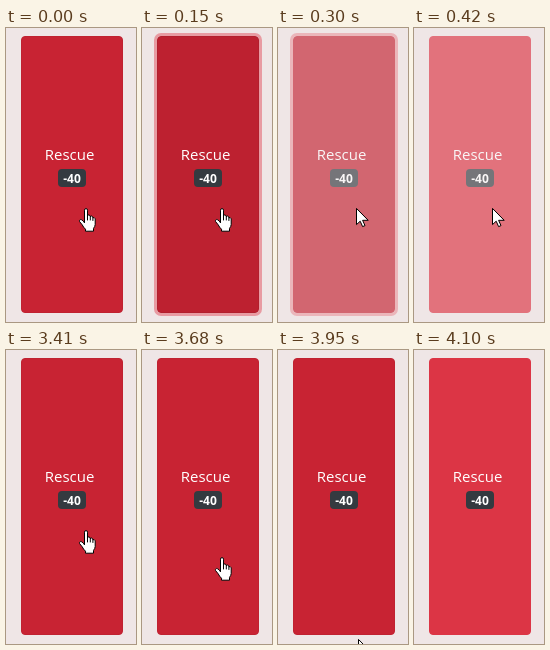
An HTML page that plays this animation: 130x294 px, repeating every 4.37 s.

```html
<!DOCTYPE html>
<html lang="en">
<head>
<meta charset="utf-8">
<style>
html, body { margin: 0; width: 100%; height: 100%; overflow: hidden; background: #efe6e6; }
svg { display: block; width: 130px; height: 294px; }
text { fill: #fff; font-family: "Open Sans", "Noto Sans", sans-serif; }
.cursor { fill: #fff; stroke: #000; stroke-linejoin: round; stroke-linecap: round; }
</style>
</head>
<body>
<svg viewBox="0 0 130 294">
  <g id="button">
    <rect id="ring" x="13.5" y="6.5" width="105" height="280" rx="5.5" fill="none" stroke="#e15361" stroke-opacity=".5" stroke-width="3"/>
    <rect id="face" x="15.5" y="8.5" width="101" height="276" rx="3.5"/>
    <text x="38.7" y="132" font-size="15">Rescue</text>
    <rect x="52" y="141" width="28" height="18" rx="4" fill="#343a40"/>
    <text x="66" y="155" font-size="12" font-weight="700" text-anchor="middle">-40</text>
  </g>
  <g id="hand" class="cursor">
    <path d="M6.5 14.5V2.2Q6.5 .6 8 .6T9.5 2.2V7.4Q10.8 6.2 12.3 7.8V8.5Q13.8 7.3 14.9 9V9.8Q16.4 9 17.2 10.8V16.5Q17 18.6 15.5 20.4V23.2H7.5V21.2Q5.6 19.6 4.2 16.8L1.6 13.6Q1 12.2 2.3 11.6 3.7 11.3 5 12.8Z"/>
    <path d="M9.5 7.4V12M12.3 8.5V12M14.9 9.8V12.5" fill="none"/>
  </g>
  <path id="arrow" class="cursor" d="M.5 .8V16.6L4.2 13.2 6.6 18.6 9 17.6 6.6 12.3H11.8Z"/>
</svg>
<script>
const LOOP = 4370;
const NORMAL = { fill: '#dc3545', stroke: '#dc3545' };
const HOVER = { fill: '#c82333', stroke: '#c02231' };
const PRESSED = { fill: '#bd2130', stroke: '#b21f2d' };
const RELEASED = { fill: '#c42232', stroke: '#c42232' };

const hand = (x, y) => ({ hand: [x, y] });
const arrow = (x, y) => ({ arrow: [x, y] });

const states = [
  { at: 0, look: HOVER, cursor: hand(72, 180) },
  { at: 150, look: PRESSED, ring: true, cursor: hand(72, 180) },
  { at: 300, look: RELEASED, ring: true, disabled: true, cursor: arrow(78, 180) },
  { at: 420, look: NORMAL, disabled: true, cursor: arrow(78, 180) },
  { at: 3290, look: NORMAL, cursor: hand(72, 180) },
  { at: 3410, look: HOVER, cursor: hand(72, 180) },
  { at: 3680, look: HOVER, cursor: hand(72, 207) },
  { at: 3800, look: HOVER, cursor: hand(72, 245) },
  { at: 3950, look: HOVER, cursor: arrow(80, 289) },
  { at: 4100, look: NORMAL, cursor: {} }
];

const el = id => document.getElementById(id);
const show = (node, on) => node.setAttribute('visibility', on ? 'visible' : 'hidden');

function placeCursor(id, point) {
  show(el(id), point);
  if (point) el(id).setAttribute('transform', `translate(${point})`);
}

function render(time) {
  const state = states.findLast(s => s.at <= time);
  el('face').setAttribute('fill', state.look.fill);
  el('face').setAttribute('stroke', state.look.stroke);
  el('button').setAttribute('opacity', state.disabled ? 0.65 : 1);
  show(el('ring'), state.ring);
  placeCursor('hand', state.cursor.hand);
  placeCursor('arrow', state.cursor.arrow);
}

const start = performance.now();
function tick() {
  render((performance.now() - start) % LOOP);
  requestAnimationFrame(tick);
}
tick();
</script>
</body>
</html>
```
